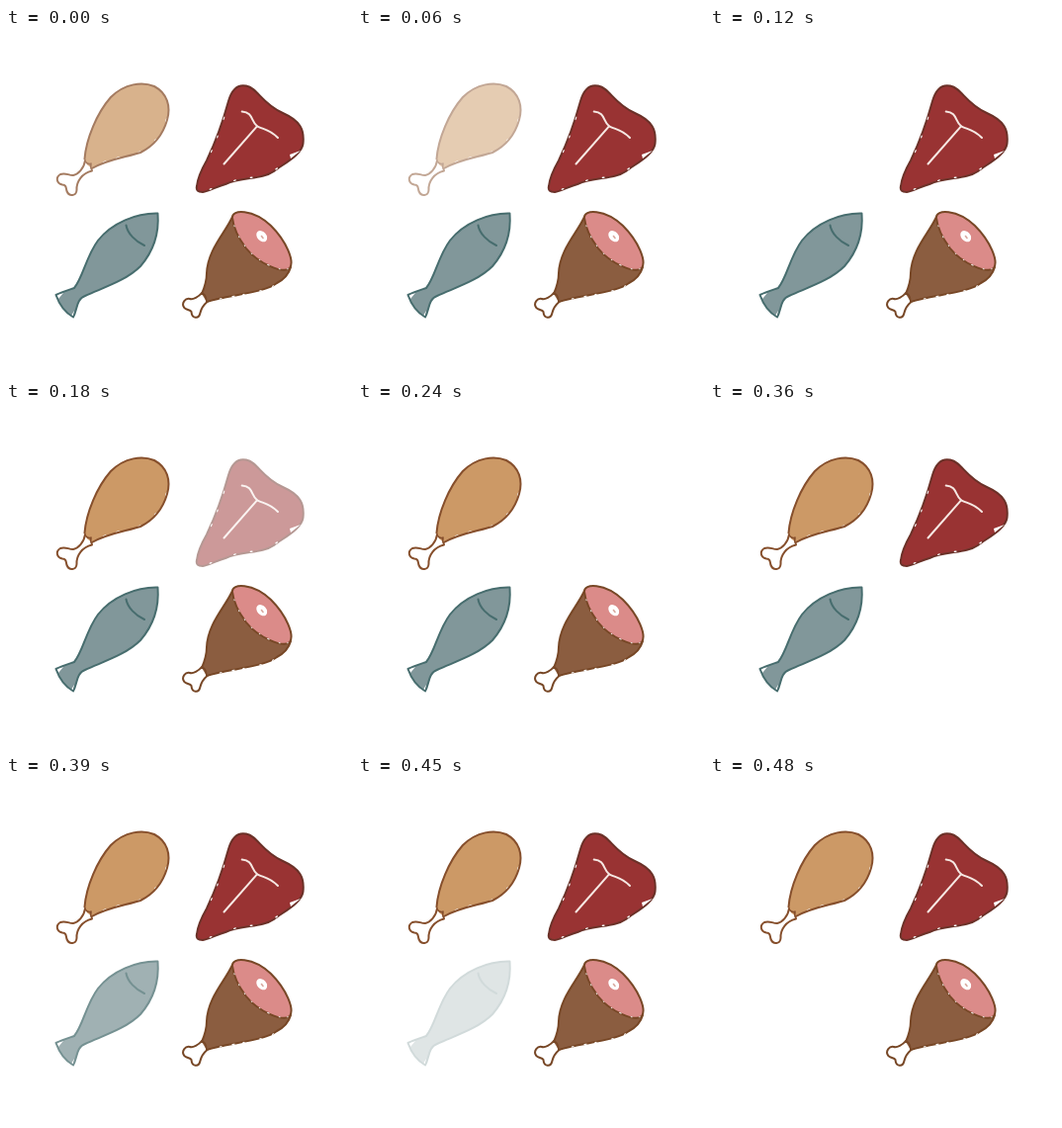
An HTML page that plays this animation: 350 px wide and 350 px high, repeating every 0.51 s.

```html
<!DOCTYPE html>
<html lang="en">
<head>
<meta charset="utf-8">
<title>Meat and fish</title>
<style>
  html, body { margin: 0; width: 100%; height: 100%; overflow: hidden; background: #fff; }
  svg { display: block; width: 100vw; height: 100vh; }
  path { stroke-linecap: round; stroke-linejoin: round; }
</style>
</head>
<body>
<svg id="stage" viewBox="0 0 350 350"></svg>
<script>
const stage = document.getElementById('stage');

function add(parent, name, attrs = {}) {
  const el = document.createElementNS('http://www.w3.org/2000/svg', name);
  for (const key in attrs) el.setAttribute(key, attrs[key]);
  return parent.appendChild(el);
}

const fill = (g, d, color) => add(g, 'path', { d, fill: color });
const line = (g, d, color, width = 2) =>
  add(g, 'path', { d, fill: 'none', stroke: color, 'stroke-width': width });

let seed = 7;
function random() {
  seed = seed * 16807 % 2147483647;
  return seed / 2147483647;
}

// Scatters small uneven dabs along the part of a path between two fractions.
function dabs(g, path, from, to, count, size, color) {
  const total = path.getTotalLength();
  for (let i = 0; i < count; i++) {
    const at = total * (from + (to - from) * (i + 0.3 + 0.4 * random()) / count);
    const p = path.getPointAtLength(at), q = path.getPointAtLength(at + 1);
    const turn = Math.atan2(q.y - p.y, q.x - p.x) * 180 / Math.PI;
    add(g, 'ellipse', {
      rx: size * (1 + random()), ry: size * 0.6, fill: color,
      transform: `translate(${p.x} ${p.y}) rotate(${turn}) translate(0 ${size * 0.5})`
    });
  }
}

function drumstick(g) {
  const ink = '#864f2c', crumb = '#c28d60';
  const d = 'M79.5 132.5C81 112 92 86 106 70C120 56 138 54 150 59C163 66 167 79 163 93C159 107 150 119 136 126C120 131 103 133 87 142';
  const body = fill(g, d + 'L82 138Z', '#cc9966');
  dabs(g, body, 0.02, 0.24, 3, 3.2, crumb);
  dabs(g, body, 0.58, 0.85, 4, 3.2, crumb);
  fill(g, d + 'L82 138Z', '#cc9966');
  dabs(g, body, 0.56, 0.95, 5, 1.4, '#fff');
  line(g, d, ink);
  line(g, 'M80 134C79 142 73 148 68 149C63 149 60 146 55 148C50 151 51 157 57 158.5C61 159 60.5 161 61.5 165C64 171 71 170 71.5 164C71 155 77 147 87 144.5', ink);
  line(g, 'M80 135Q84 139 86 137Q85 141 87 144', ink, 1.6);
}

function steak(g) {
  const fat = '#f6e8e3';
  const d = 'M193 160C194 150 199 141 203 134C213 113 219 96 225 74C229 60 236 57 243 58.5C255 61 258 76 280 86C298 94 302 103 300.5 117C299 128 283 136 271 145C258 154 240 150 222 158C212 161 205 165 199 166C194 166 192 164 193 160Z';
  const body = fill(g, d, '#993333');
  line(g, d, '#6b3128');
  dabs(g, body, 0.08, 0.24, 3, 1, '#fff');
  dabs(g, body, 0.7, 0.98, 4, 1.2, '#fff');
  fill(g, 'M287 128L298 124L288 132Z', '#fff');
  line(g, 'M238.7 84.5C250 85 248 95 254 99.3C261 103 266 102 275 111', fat);
  line(g, 'M254 99.3L220.5 137.5', fat);
}

function ham(g) {
  const ink = '#774726';
  const side = 'M229 191C222 207 204 224 203 248C203 256 201 262 198 269';
  const under = '203 277C225 270 262 268 274 258C282 254 286 249 288 242';
  const face = 'M229 192C228 183 250 183 268 200C284 216 292 236 287 243C280 249 255 238 243 223C234 211 230 202 229 192Z';
  fill(g, `${side}L${under}L262 225Z`, '#8b5d40');
  const cut = fill(g, face, '#db8b89');
  line(g, side, ink);
  const base = line(g, 'M' + under, ink);
  line(g, face, ink);
  dabs(g, base, 0.05, 0.8, 5, 1, '#fff');
  dabs(g, cut, 0.5, 0.98, 8, 0.8, '#fff');
  line(g, 'M198 268C195 272 189 275 186 274C181 273 178 278 179.5 281.5C181 286 186 284 187.5 287C188 294 195 295 196.5 288C198 282 200 280 203.5 277', ink);
  line(g, 'M198 269Q202 268 203 277', ink, 1.6);
  add(g, 'ellipse', { rx: 6.3, ry: 4.6, fill: '#fff', transform: 'translate(258.7 210.7) rotate(48)' });
  line(g, 'M258.5 210.5L260 212.5', '#d9a9a0', 1.6);
}

function fish(g) {
  const ink = '#476d6e';
  const d = 'M153.5 187.5C132 187 107 197 93 215C81 231 78 252 69 263C63 265 56 267 50.5 270C54 280 60 288 68 292.5C72 286 71 274 80 271C97 263 121 256 136 241C149 226 155 207 153.5 187.5Z';
  fill(g, d, '#81979a');
  fill(g, 'M51 270L58 268L53 274ZM66 291L69 286L68 291Z', '#fff');
  line(g, d, ink);
  line(g, 'M121.5 199.5C123 208 131 216 140 220', ink);
}

// Each piece in turn drops a quarter of its opacity per tick, then returns.
const TICK = 30, TICKS = 17;

[drumstick, steak, ham, fish].forEach((paint, turn) => {
  const g = add(stage, 'g');
  paint(g);
  const frames = Array.from({ length: TICKS + 1 }, (_, i) => {
    const step = i - turn * 4;
    return {
      offset: i / TICKS,
      opacity: step > 0 && step < 5 ? 1 - step / 4 : 1,
      easing: 'step-end'
    };
  });
  g.animate(frames, { duration: TICK * TICKS, iterations: Infinity }).startTime =
    document.timeline.currentTime;
});
</script>
</body>
</html>
```
